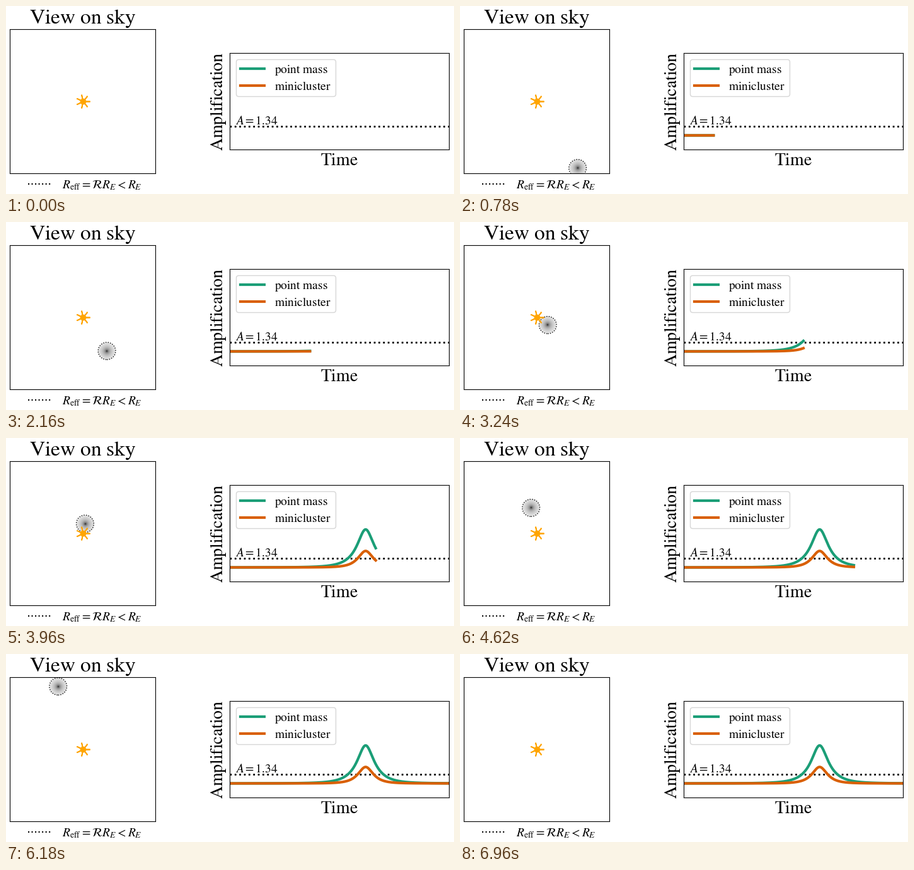
Write a matplotlib script that moves like this. It is 711 by 300 pixels and loops after 7.55 s.

```python
import numpy as np
import matplotlib.pyplot as plt
from matplotlib.animation import FuncAnimation
from matplotlib.lines import Line2D
from matplotlib.patches import Circle

W, H, DPI = 711, 300, 100
INTERVAL, FRAMES = 25, 302      # 7550 ms per loop
STEP, LAST = 60, 116            # the lens moves every 60 ms, then rests
RATIO = 0.6                     # effective over point-mass Einstein radius
GREEN, ORANGE = "#1b9e77", "#d95f02"

plt.rcParams.update({
    "font.family": "Liberation Serif",
    "mathtext.fontset": "stix",
    "axes.linewidth": 0.8,
})


def roman(text):
    return r"$\mathrm{%s}$" % text.replace(" ", r"\ ")


def panel(left, top, width, height, xlim, ylim):
    """Axes without ticks, placed in pixels from the top left corner."""
    ax = fig.add_axes([left / W, 1 - (top + height) / H, width / W, height / H])
    ax.set(xlim=xlim, ylim=ylim, xticks=[], yticks=[])
    return ax


def label(x, y, text):
    fig.text(x / W, 1 - y / H, text, fontsize=14, va="baseline")


def amplification(u):
    return (u**2 + 2) / (u * np.sqrt(u**2 + 4))


def lens_x(y):
    return 0.5 - 0.5 * y


def halo(size=96):
    """Black disc whose opacity falls off logarithmically with radius."""
    axis = (np.arange(size) + 0.5) / size * 2 - 1
    r = np.hypot(*np.meshgrid(axis, axis))
    rgba = np.zeros((size, size, 4))
    rgba[..., 3] = np.where(r < 1, np.clip(0.1 - 0.22 * np.log(r), 0, 1), 0)
    return rgba


fig = plt.figure(figsize=(W / DPI, H / DPI), dpi=DPI, facecolor="white")

# Sky view
sky = panel(6, 37, 231, 230, (-5, 5), (-5, 5))
sky.set_title(roman("View on sky"), fontsize=24)
cloud = sky.imshow(halo(), extent=(-1, 1, -1, 1), aspect="auto",
                   interpolation="bilinear")
sky.set(xlim=(-5, 5), ylim=(-5, 5))
ring = sky.add_patch(Circle((0, 0), RATIO, fill=False, ls=":", lw=1))
sky.plot(0, 0, marker=(7, 2, -90), ms=16, mew=1.3, color="orange")
sky.plot(0, 0, "o", ms=6, color="orange")

fig.add_artist(Line2D([34.5 / W, 73.4 / W], [1 - 284 / H] * 2,
                      color="black", ls=":", lw=1.5))
label(88.7, 291, r"$R_{\mathrm{eff}}=\mathcal{R}R_E<R_E$")

# Light curves
plot = panel(355, 75, 348, 154, (-6, 4), (0.48, 4.04))
plot.set_xlabel(roman("Time"), fontsize=20)
plot.set_ylabel(roman("Amplification"), fontsize=20, labelpad=2)
plot.axhline(1.34, color="black", ls=":", lw=2)
point, = plot.plot([], [], color=GREEN, lw=3, label=roman("point mass"))
cluster, = plot.plot([], [], color=ORANGE, lw=3, label=roman("minicluster"))
plot.legend(loc="upper left", fontsize=14, borderpad=0.35, labelspacing=0.36)
label(364, 189, r"$A=1.34$")


def update(frame):
    n = min((frame * INTERVAL + INTERVAL - 1) // STEP, LAST)
    y = -5.94 + 0.1 * n
    x = lens_x(y)
    ring.center = x, y
    cloud.set_extent((x - RATIO, x + RATIO, y - RATIO, y + RATIO))

    # The curves follow the lens and start empty.
    t = np.linspace(-6, y, 5 * n + 2) if n else np.array([])
    u = np.hypot(lens_x(t), t)
    point.set_data(t, amplification(u))
    cluster.set_data(t, amplification(u / RATIO))
    return cloud, ring, point, cluster


anim = FuncAnimation(fig, update, frames=FRAMES, interval=INTERVAL,
                     repeat=True, cache_frame_data=False)
plt.show()
```
